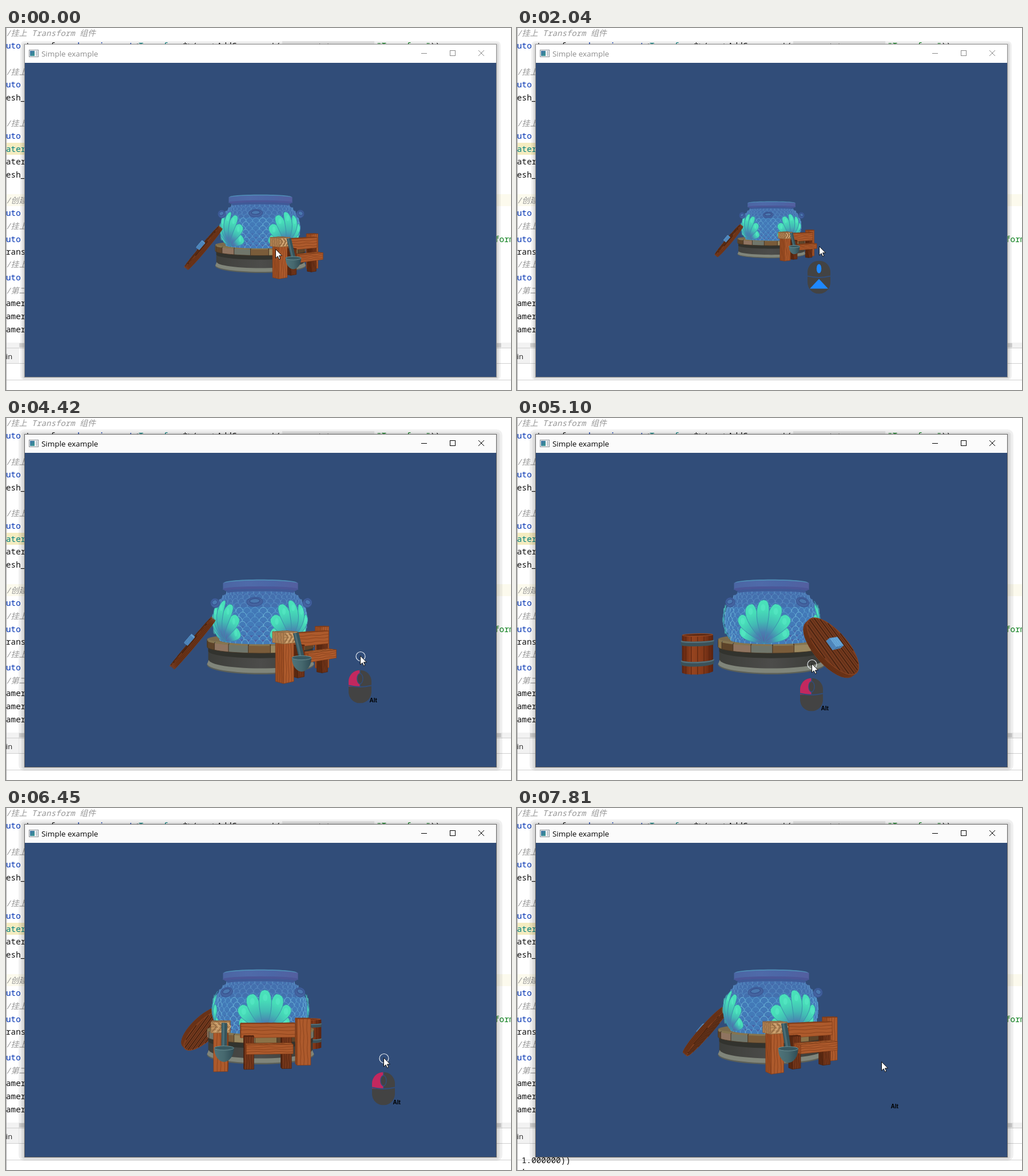
Animation, 883 px wide and 634 px high, one loop 8000 ms. Source, as an HTML page with a canvas:

```html
<!DOCTYPE html>
<html>
<head>
<meta charset="utf-8">
<title>Simple example</title>
<style>
html, body { margin: 0; width: 100%; height: 100%; overflow: hidden; background: #fff; }
canvas { display: block; }
</style>
</head>
<body>
<canvas id="stage" width="883" height="634"></canvas>
<script>
const ctx = document.getElementById('stage').getContext('2d');
const LOOP = 8000, FOCAL = 520, CX = 445, CY = 336, SKY = '#314d79';
const MONO = '"Noto Sans Mono", "Noto Sans CJK SC", monospace';
const rad = d => d * Math.PI / 180;

// time, cursor x, cursor y, camera distance, yaw, pointer overlay
const STEPS = [
  [0, 471, 387, 612, 39, ''],
  [340, 528, 382, 612, 39, ''],
  [1020, 528, 382, 746, 39, 'down'],
  [1360, 528, 382, 846, 39, 'down'],
  [1700, 528, 382, 846, 39, 'idle'],
  [2040, 528, 382, 812, 39, 'up'],
  [2380, 528, 382, 582, 39, 'up'],
  [3060, 528, 382, 712, 39, 'down'],
  [3400, 668, 473, 712, 39, ''],
  [3740, 660, 405, 520, 39, ''],
  [4080, 658, 405, 520, 39, 'click'],
  [4420, 619, 416, 520, 39, 'click'],
  [4760, 584, 422, 520, 87, 'click'],
  [5100, 515, 430, 520, 171, 'click'],
  [5430, 522, 430, 520, 163, 'click'],
  [5770, 630, 432, 520, 42, 'click'],
  [6110, 634, 433, 520, 38, 'click'],
  [6450, 660, 437, 520, 5, 'click'],
  [6790, 676, 440, 520, -10, 'click'],
  [7130, 667, 441, 520, 0, 'click'],
  [7470, 641, 443, 520, 24, 'click'],
  [7810, 637, 444, 520, 28, 'alt']
];

let dist, yaw, start;

// ---- drawing helpers
function rect(x, y, w, h, color) {
  ctx.fillStyle = color;
  ctx.fillRect(x, y, w, h);
}
function rounded(x, y, w, h, r, color) {
  ctx.beginPath();
  ctx.roundRect(x, y, w, h, r);
  ctx.fillStyle = color;
  ctx.fill();
}
function text(str, x, y, color, font) {
  ctx.font = font;
  ctx.fillStyle = color;
  ctx.fillText(str, x, y);
}
function trace(pts, close) {
  ctx.beginPath();
  pts.forEach(([x, y]) => ctx.lineTo(x, y));
  if (close) ctx.closePath();
}
function poly(pts, fill, stroke, width = 1) {
  trace(pts, true);
  if (fill) { ctx.fillStyle = fill; ctx.fill(); }
  if (stroke) { ctx.strokeStyle = stroke; ctx.lineWidth = width; ctx.stroke(); }
}
function line(pts, color, width = 1) {
  trace(pts);
  ctx.strokeStyle = color;
  ctx.lineWidth = width;
  ctx.stroke();
}
function ellipse(x, y, rx, ry, fill, stroke, width = 1) {
  ctx.beginPath();
  ctx.ellipse(x, y, rx, ry, 0, 0, 7);
  if (fill) { ctx.fillStyle = fill; ctx.fill(); }
  if (stroke) { ctx.strokeStyle = stroke; ctx.lineWidth = width; ctx.stroke(); }
}
function gradient(x0, y0, x1, y1, ...colors) {
  const g = ctx.createLinearGradient(x0, y0, x1, y1);
  colors.forEach((c, i) => g.addColorStop(i / (colors.length - 1), c));
  return g;
}
const mix = (a, b, f) => [a[0] + (b[0] - a[0]) * f, a[1] + (b[1] - a[1]) * f];
const range = (n, fn) => Array.from({ length: n }, (_, i) => fn(i));

// ---- projection
function project(x, y, z) {
  const k = FOCAL / (dist - z);
  return [CX + x * k, CY + y * k];
}
const depth = (x, z) => z * Math.cos(yaw) - x * Math.sin(yaw);
const local = (x, y, z) => project(x * Math.cos(yaw) + z * Math.sin(yaw), y, depth(x, z));
const limit = r => Math.acos(r / dist);
const wrap = a => Math.atan2(Math.sin(a), Math.cos(a));

// A point on a surface of revolution, held at the visible silhouette.
function surf(r, a, y) {
  const m = limit(r), c = Math.max(-m, Math.min(m, a));
  return project(r * Math.sin(c), y, r * Math.cos(c));
}
function patch(mid, half, r0, y0, r1, y1, fill, stroke) {
  mid = wrap(mid);
  if (Math.abs(mid) > limit(r0) + half) return;
  const arc = (r, y) => range(5, i => surf(r, mid + half * (i / 2 - 1), y));
  poly([...arc(r0, y0), ...arc(r1, y1).reverse()], fill, stroke, 0.8);
}
function band(r0, y0, r1, y1, fill) {
  const arc = (r, y) => range(31, i => surf(r, limit(r) * (i / 15 - 1), y));
  poly([...arc(r0, y0), ...arc(r1, y1).reverse()], fill);
}

const FACES = ['001 101 111 011', '101 100 110 111', '000 001 011 010',
               '100 000 010 110', '000 100 101 001', '011 111 110 010']
  .map(f => f.split(' '));
const WOOD = { face: ['#ad5a2c', '#8e4520', '#9d4e23', '#7a3a1a', '#c0733c', '#4c2010'], grain: '#7f3c19' };
const DARK_WOOD = { face: ['#74361a', '#5a2811', '#5f2b12', '#4c2010', '#8a4220', '#3a180b'], grain: '#4c220f' };
const ROPE = { face: ['#c0925f', '#a5784d', '#ad7e50', '#8f6640', '#d2a878', '#705030'], grain: '#86603c' };
const STEEL = { face: ['#67a6d6', '#4a7fb4', '#4a7fb4', '#40709f', '#8cc4e8', '#35608c'], grain: '#5590c4' };

function box(map, u, v, w, style) {
  FACES.forEach((face, i) => {
    const q = face.map(c => map(u[c[0]], v[c[1]], w[c[2]]));
    const [a, b, c, d] = q;
    if ((b[0] - a[0]) * (c[1] - a[1]) - (b[1] - a[1]) * (c[0] - a[0]) <= 0) return;
    poly(q, style.face[i], style.grain, 0.7);
    const wide = Math.hypot(b[0] - a[0], b[1] - a[1]) > Math.hypot(c[0] - b[0], c[1] - b[1]);
    for (const f of [0.22, 0.45, 0.72]) {
      const [p, q] = wide ? [mix(a, d, f), mix(b, c, f + 0.06)] : [mix(a, b, f), mix(d, c, f + 0.06)];
      const bend = range(9, n => mix(p, q, n / 8)).map(([x, y], n) => {
        const sway = Math.sin(n * 1.7 + f * 20) * 0.7;
        return wide ? [x, y + sway] : [x + sway, y];
      });
      line(bend, style.grain, 0.7);
    }
  });
}

// ---- model
const potRadius = y => 81 * Math.sqrt(1 - ((y - 16) / 66) ** 2);

function drawBase() {
  band(90, 62, 90, 87, gradient(CX - 90, 0, CX + 90, 0, '#3d3e3a', '#4c4c4a', '#3a3b37'));
  band(90, 62, 90, 70, '#32332e');
  band(89, 85, 92, 92, '#80857a');
  band(92, 91, 92, 93, '#5c6058');
  poly(range(48, i => {
    const a = i * Math.PI / 24;
    return project(92 * Math.sin(a), 50, 92 * Math.cos(a));
  }), '#7a6a4c');
  const stones = ['#8a7248', '#5d4329', '#8f7460', '#70766b', '#7a5c3a', '#9a8860'];
  for (let i = 0; i < 18; i++) {
    const a = yaw + i * Math.PI / 9;
    patch(a, Math.PI / 18, 92, 51, 92, 62.5, stones[i % 6], '#463524');
    patch(a, Math.PI / 19, 90, 49, 92, 52, '#857550');
  }
}

function drawScales() {
  ctx.lineWidth = FOCAL / dist;
  for (let row = 0; row < 12; row++) {
    const y = -29 + row * 7, r = potRadius(y), half = Math.PI / 40, upper = row < 4;
    for (let i = 0; i < 40; i++) {
      const a = wrap(yaw + (2 * i + row % 2) * half);
      if (Math.abs(a) > limit(r) - half * 0.8) continue;
      ctx.beginPath();
      ctx.moveTo(...surf(r, a - half, y + 4));
      ctx.bezierCurveTo(...surf(r, a - half * 0.9, y - 5), ...surf(r, a + half * 0.9, y - 5), ...surf(r, a + half, y + 4));
      ctx.fillStyle = upper ? '#4470ae' : '#437ab8';
      ctx.fill();
      ctx.strokeStyle = upper ? '#5a8fc4' : i % 3 ? '#5b9fd0' : '#72bedd';
      ctx.stroke();
    }
  }
}

function drawShell(mid) {
  mid = wrap(mid);
  if (Math.abs(mid) > rad(112)) return;
  const place = (u, v) => surf(potRadius(v) + 2.5, mid + u / 82, v);
  const k = FOCAL / dist;
  for (const i of [-3, 3, -2, 2, -1, 1, 0]) {
    const turn = rad(22 * i), len = 65 - 2.3 * i * i;
    const at = (along, side) => place(
      Math.sin(turn) * along + Math.cos(turn) * side,
      Math.min(52, 50 - Math.cos(turn) * along + Math.sin(turn) * side));
    const edge = range(25, n => {
      const t = n / 24 * Math.PI * 2;
      const along = len * (1 - Math.cos(t)) / 2;
      const round = Math.sign(Math.sin(t)) * Math.abs(Math.sin(t)) ** 0.75;
      return at(along, round * 12.5 * (0.2 + 0.85 * along / len));
    });
    poly(edge, gradient(...at(0, 0), ...at(len, 0), '#5460a2', '#4a80b0', '#42bbb4', '#47dcb8', '#4ae2ba'), '#3c8fac', 1);
    ellipse(...at(len * 0.82, 0), 4 * k * Math.max(0.3, Math.cos(mid)), 6 * k, '#62f0cc66');
  }
}

function drawHandle(a) {
  a = wrap(a);
  if (Math.abs(a) > rad(103)) return;
  const k = FOCAL / dist, face = Math.max(0.55, Math.cos(a));
  const [x, y] = project(81 * Math.sin(a), -12, 81 * Math.cos(a));
  ctx.save();
  ctx.translate(x, y);
  ctx.rotate(Math.sin(a) * 0.55);
  ellipse(0, 0, 14 * face * k, 8 * k, '#44639f', '#3a5692');
  ellipse(0, -1.5 * k, 9 * face * k, 4 * k, '#4a78b0', '#37528e', 1.4);
  ctx.restore();
}

function drawPot() {
  const ys = range(24, i => -34 + i * 84 / 23);
  const side = s => ys.map(y => surf(potRadius(y), s * 4, y));
  const bottom = range(21, i => surf(potRadius(50), -1.5 + i * 0.15, 50));
  const k = FOCAL / dist;
  poly([...side(-1), ...bottom, ...side(1).reverse()],
    gradient(0, CY - 34 * k, 0, CY + 52 * k, '#4763a6', '#4179b7', '#4272b2', '#4a5da2'));
  drawScales();
  const quarters = [0, 1, 2, 3].map(i => yaw + i * Math.PI / 2)
    .sort((a, b) => Math.cos(a) - Math.cos(b));
  quarters.forEach(drawShell);
  quarters.forEach(a => drawHandle(a + Math.PI / 4));
  band(60, -33, 57, -29, '#3f5a98');
  band(65, -46, 65, -34, gradient(CX - 66 * k, 0, CX + 66 * k, 0, '#4b65a3', '#4f6aa9', '#4c66a6', '#545f9f'));
  band(63, -46.8, 65, -45, '#4f8fb8');
  band(65, -36, 61, -32.5, '#4b5798');
}

function drawBarrel() {
  const a = yaw + rad(125), x = 128 * Math.sin(a), z = 128 * Math.cos(a);
  const lean = Math.atan2(-x, dist - z);
  const at = (r, t, y) => project(x + r * Math.sin(t), y, z + r * Math.cos(t));
  const hoop = (r, y0, y1, fill) => {
    const arc = y => range(17, i => at(r, lean + rad(85) * (i / 8 - 1), y));
    poly([...arc(y0), ...arc(y1).reverse()], fill);
  };
  const [left] = at(24, lean - 1.5, 60), [right] = at(24, lean + 1.5, 60);
  hoop(23.5, 39, 96, gradient(left, 0, right, 0, '#5f2410', '#96441f', '#863a1a', '#5a220f'));
  poly(range(24, i => at(23, i * Math.PI / 12, 39)), '#5c2813', '#a25026');
  for (let i = 0; i < 16; i++) {
    const t = wrap(yaw + i * Math.PI / 8 - lean);
    if (Math.abs(t) < 1.45) line([at(24, t + lean, 40), at(24, t + lean, 96)], '#5c2611', 1.2);
  }
  for (const y of [47, 77]) {
    hoop(25, y, y + 7, '#3b5159');
    hoop(25, y, y + 2, '#56707a');
  }
}

function drawLid() {
  const a = yaw - rad(119), sin = Math.sin(a), cos = Math.cos(a), size = 52;
  const at = (s, down, n) => {
    const r = 115 + 0.645 * down + 0.765 * n, y = 55 + 0.765 * down - 0.645 * n;
    return project(r * sin + s * cos, y, r * cos - s * sin);
  };
  const outside = 0.765 * (dist * cos - 115) + 0.645 * 55 > 0;
  const disc = (n, fill, stroke) =>
    poly(range(40, i => at(size * Math.cos(i * Math.PI / 20), size * Math.sin(i * Math.PI / 20), n)), fill, stroke, 1.2);
  const grip = () => box(at, [-13, 13], [-8, 8], [4, 11], STEEL);
  if (!outside) grip();
  for (let i = 0; i < 5; i++) disc((outside ? 1 : -1) * (i * 2 - 4), '#54270f', '#74381c');
  const n = outside ? 4 : -4;
  disc(n, '#6e361c', '#8a4422');
  for (let s = -48; s <= 48; s += 4) {
    const h = Math.sqrt((size - 1) ** 2 - s * s), seam = s % 16 === 0;
    line([at(s, -h, n), at(s, h, n)], seam ? '#41200f' : s % 8 ? '#7f4224' : '#5e2d15', seam ? 1.3 : 0.8);
  }
  if (outside) grip();
}

function drawLadle() {
  const x = -58, z = 152, k = FOCAL / (dist - depth(x, z));
  const [tx, ty] = local(x, 29, z - 10), [bx, by] = local(x, 59, z);
  line([[tx, ty], [bx, by]], '#34535b', 7 * k);
  line([[tx - k, ty], [bx - k, by]], '#4a6c74', 2.5 * k);
  ctx.beginPath();
  ctx.ellipse(bx, by, 12 * k, 17 * k, 0, 0, Math.PI);
  ctx.fillStyle = gradient(bx - 12 * k, 0, bx + 12 * k, 0, '#4f747a', '#46686e', '#2f4c55');
  ctx.fill();
  ellipse(bx, by, 12 * k, 2.6 * k, '#385860', '#6b8e92');
}

function drawRope() {
  box(local, [-75, -51], [28, 42], [117, 138], ROPE);
  for (let i = 0; i < 6; i++) {
    const x = -73 + i * 3.6;
    line([local(x, 29, 138), local(x + 5, 34, 138), local(x - 1, 41, 138)], i % 2 ? '#d8b080' : '#8c643e', 1.3);
  }
}

function drawModel() {
  const part = (x, z, draw) => ({ z: depth(x, z), draw });
  const wood = (x, z, w, d, y0, y1, style = WOOD) =>
    part(x, z, () => box(local, [x - w / 2, x + w / 2], [y0, y1], [z - d / 2, z + d / 2], style));
  const props = [
    { z: 128 * Math.cos(yaw + rad(125)), draw: drawBarrel },
    { z: 115 * Math.cos(yaw - rad(119)), draw: drawLid },
    wood(54, 92, 20, 12, 27, 94),
    wood(-26, 116, 13, 10, 49, 93, DARK_WOOD),
    wood(25, 116, 13, 10, 49, 93, DARK_WOOD),
    wood(0, 114, 74, 9, 32, 51),
    wood(0, 130, 61, 15, 58, 70),
    wood(-63, 127, 18, 15, 28, 92),
    part(-63, 128, drawRope),
    part(-58, 152, drawLadle)
  ].sort((a, b) => a.z - b.z);
  props.filter(p => p.z < 0).forEach(p => p.draw());
  drawBase();
  drawPot();
  props.filter(p => p.z >= 0).forEach(p => p.draw());
}

// ---- desktop
const BLUE = '#0033b3', INK = '#111', TEAL = '#00807f', GREEN = '#067d17', GREY = '#969696';
const CODE = [
  [14, '/挂上 Transform 组件', GREY], [82, '/挂上', GREY], [104, 'uto', BLUE], [127, 'esh_', INK],
  [172, '/挂上', GREY], [194, 'uto', BLUE], [217, 'ater', TEAL], [239, 'ater', INK], [262, 'esh_', INK],
  [307, '/创建', GREY], [329, 'uto', BLUE], [352, '/挂上', GREY], [375, 'uto', BLUE], [397, 'rans', INK],
  [419, '/挂上', GREY], [442, 'uto', BLUE], [465, '/第二', GREY], [487, 'amer', INK], [510, 'amer', INK], [533, 'amer', INK]
];

function drawEditor(showLog) {
  const font = '14.3px ' + MONO, step = 8.58;
  rect(0, 0, 883, 634, '#fff');
  rect(0, 201, 34, 21, '#f5ecc0');
  rect(0, 291, 883, 21, '#fcfaed');
  for (const [y, str, color] of CODE) {
    text(str, 0, y, color, color === GREY ? 'italic 14px ' + MONO : font);
  }
  text('uto', 0, 36, BLUE, font);
  text('transform=', 4 * step, 36, INK, font);
  text('dynamic_cast', 14 * step, 36, BLUE, font);
  text('<', 26 * step, 36, INK, font);
  text('Transform', 27 * step, 36, TEAL, font);
  text('*>(go->AddComponent(', 36 * step, 36, INK, font);
  rect(483, 23, 161, 17, '#ebebeb');
  text('component_type_name:', 488, 36, '#7a7a7a', '12px ' + MONO);
  text('"Transform"', 648, 36, GREEN, font);
  text('));', 742, 36, INK, font);
  text('form', 854, 375, GREEN, font);

  rect(0, 551, 883, 9, '#f2f2f2');
  rect(23, 552, 843, 7, '#d3d3d3');
  rect(0, 560, 883, 1, '#d0d0d0');
  rect(0, 561, 23, 26, '#f2f2f2');
  text('in', 0, 580, '#222', '13px "Open Sans", sans-serif');
  rect(0, 587, 883, 1, '#d0d0d0');
  rect(0, 616, 883, 1, '#d0d0d0');
  if (showLog) {
    text('1.000000))', 8, 622, INK, font);
    text(',', 7, 634, INK, font);
  }
  rect(0, 0, 1, 634, '#a8a8a8');
}

function drawWindow(active) {
  // stepped soft shadow
  const reach = active ? [10, 6, 3] : [7, 4, 2];
  for (const r of reach) rounded(32 - r, 30 - r, 826 + 2 * r, 582 + 1.6 * r, r, 'rgba(0,0,0,.06)');
  rect(32, 28, 826, 584, active ? '#606060' : '#8c8c8c');
  rect(33, 29, 824, 32, active ? '#fbfbfb' : '#fff');
  rect(33, 61, 824, 550, SKY);

  rect(40, 38, 17, 13, '#8a8f96');
  rect(41, 39, 15, 11, '#f4f6f8');
  rect(42, 40, 8, 9, gradient(42, 40, 50, 49, '#3d6ea8', '#3a9a90'));
  rect(52, 40, 3, 9, '#c4ccd4');

  const ink = active ? '#000' : '#8b8b8b';
  text('Simple example', 62, 50, ink, '13.4px "Open Sans", sans-serif');
  rect(726, 44, 10, 1, ink);
  ctx.strokeStyle = ink;
  ctx.lineWidth = 1;
  ctx.strokeRect(776.5, 39.5, 9, 9);
  line([[826, 39], [836, 49]], ink);
  line([[836, 39], [826, 49]], ink);
}

// ---- pointer
function drawMouse(x, y, mode) {
  ctx.save();
  ctx.translate(x, y);
  ctx.beginPath();
  ctx.roundRect(-20, 0, 40, 58, 20);
  ctx.clip();
  rect(-20, 0, 40, 58, '#434343');
  if (mode === 'click') {
    rect(-20, 0, 20, 29, '#c2285f');
    rect(-0.7, 0, 1.4, 29, SKY);
    ellipse(0, 15, 5, 9, '#434343', SKY, 1.5);
  } else {
    ellipse(0, 14, 4.2, 8, '#1e88ff');
  }
  ctx.beginPath();
  ctx.moveTo(-20, 27);
  ctx.quadraticCurveTo(0, 32, 20, 27);
  ctx.strokeStyle = SKY;
  ctx.lineWidth = 2;
  ctx.stroke();
  if (mode === 'up') poly([[-16, 49], [0, 32], [16, 49]], '#1e88ff');
  if (mode === 'down') poly([[-16, 35], [16, 35], [0, 53]], '#1e88ff');
  ctx.restore();
}

function drawPointer(x, y, mode) {
  if (mode && mode !== 'alt') drawMouse(x, y + 25.5, mode);
  if (mode === 'click' || mode === 'alt') {
    text('Alt', x + 16.5, y + 82, '#000', 'bold 10px "Liberation Sans", Arial, sans-serif');
  }
  if (mode === 'click') ellipse(x + 1, y + 1.5, 8, 8, null, '#e8ecf2', 1.2);
  const arrow = [[0, 0], [0, 15.5], [3.6, 12.2], [6, 17.6], [8.3, 16.6], [6, 11.3], [11, 11.3]];
  poly(arrow.map(([u, v]) => [x + u + 0.5, y + v + 0.5]), '#fff', '#111', 1);
}

function frame(now) {
  start ??= now;
  const t = (now - start) % LOOP;
  const [, x, y, d, turn, mode] = STEPS.filter(s => s[0] <= t).pop();
  dist = d;
  yaw = rad(turn);
  drawEditor((t >= 5770 && t < 6450) || t >= 7130);
  drawWindow(t >= 4080);
  drawModel();
  drawPointer(x, y, mode);
  requestAnimationFrame(frame);
}
requestAnimationFrame(frame);
</script>
</body>
</html>
```
